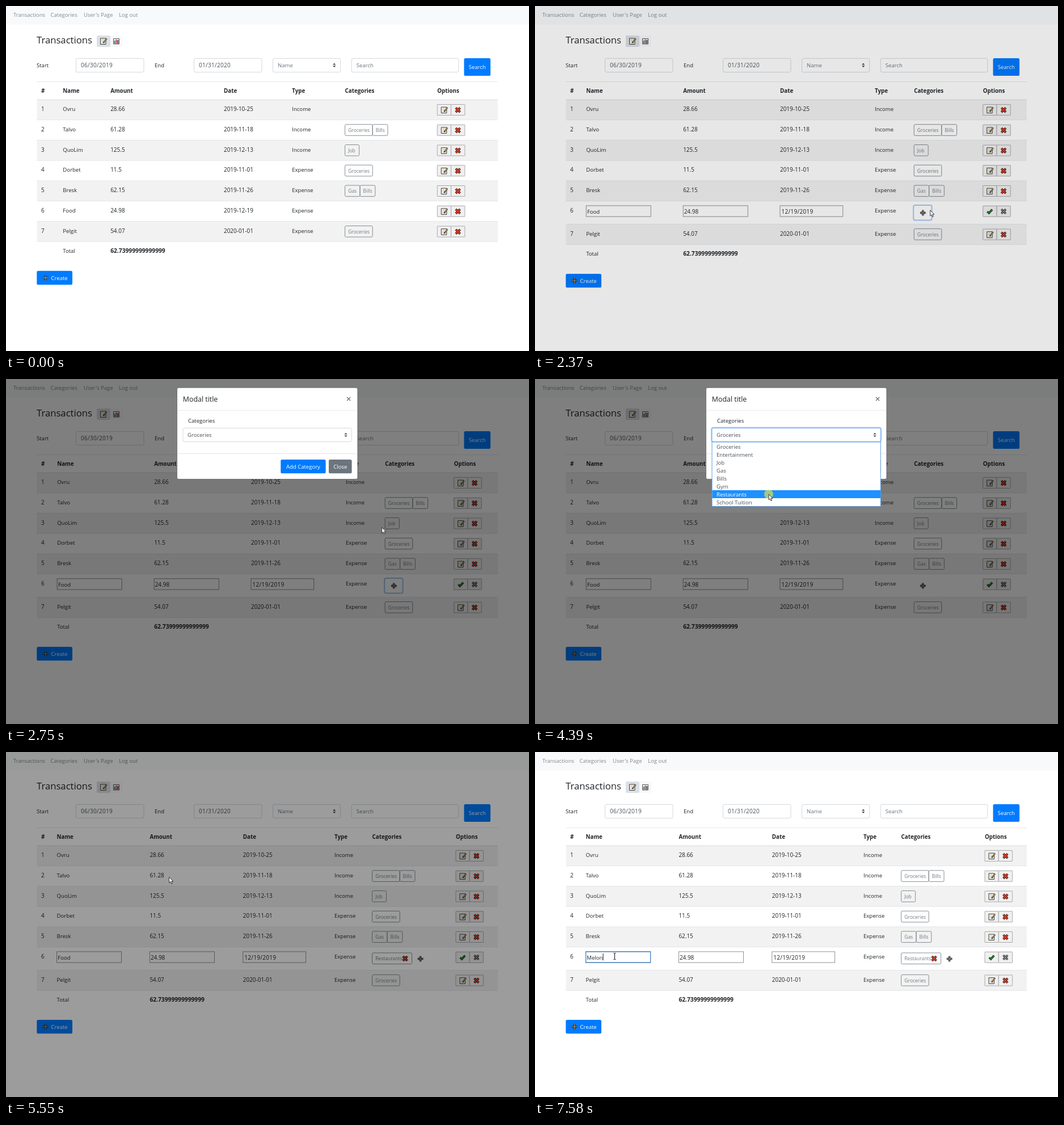
An HTML page for the animation above (8000 ms loop, 922 by 608 pixels).

```html
<!DOCTYPE html>
<html lang="en">
<head>
<meta charset="utf-8">
<title>Transactions</title>
<style>
  html, body { margin: 0; width: 100%; height: 100%; overflow: hidden; background: #fff; }
  svg { display: block; width: 922px; height: 608px; }
  text { font-family: "Open Sans", "Noto Sans", sans-serif; white-space: pre; }
</style>
</head>
<body>
<svg id="stage" viewBox="0 0 922 608" xmlns="http://www.w3.org/2000/svg"></svg>
<script>
const LOOP = 8000;
const INK = '#212529', FIELD = '#495057', MUTED = '#6c757d', LINE = '#dee2e6', BLUE = '#007bff';

// Shape helpers: each returns markup
const text = (x, y, s, o = {}) =>
  `<text x="${x}" y="${y}" font-size="${o.size || 9.55}" fill="${o.fill || INK}"` +
  ` font-weight="${o.weight || 400}" text-anchor="${o.anchor || 'start'}"` +
  ` letter-spacing="${o.gap || 0}"${o.id ? ` id="${o.id}"` : ''}>${s}</text>`;
const num = (x, y, s) => text(x, y, s, { size: 9.95 });
const bold = (x, y, s, size = 9.8) => text(x, y, s, { size, weight: 700 });
const box = (x, y, w, h, fill, stroke = 'none', r = 0, sw = 0.9, extra = '') =>
  `<rect x="${x}" y="${y}" width="${w}" height="${h}" rx="${r}" fill="${fill}" stroke="${stroke}" stroke-width="${sw}" ${extra}/>`;
const rule = (x, y, w, h = 0.8) => box(x, y, w, h, LINE);
const at = (x, y, s) => `<g transform="translate(${x} ${y})">${s}</g>`;
const group = (id, s) => `<g id="${id}">${s}</g>`;
const stroke = (d, color, w) => `<path d="${d}" fill="none" stroke="${color}" stroke-width="${w}"/>`;
const outlined = (d, color, w) => stroke(d, '#1c1c1c', w + 1.8) + stroke(d, color, w);

// Icons, centred on 0,0
const memo = '<path d="M-5-5H4.5V5.5H-5Z" fill="#f5f0e2" stroke="#3c3c3c" stroke-width="1"/>' +
  stroke('M-3-2.5H1M-3-.5H0M-3 1.5H-1M-3 3.5H3', '#aaa', 0.6) +
  stroke('M6-4.5L.2 2.8', '#2b2b2b', 2.5) + stroke('M5.6-4L1.4 1.3', '#e0b566', 1.1);
const chart = '<path d="M-5-4.5H5V5H-5Z" fill="#f4f4f4" stroke="#555" stroke-width="1"/>' +
  stroke('M-2.8 4.5V-1', '#35608e', 1.8) + stroke('M0 4.5V-3', '#c23b32', 1.8) +
  stroke('M2.8 4.5V-2', '#363048', 1.8);
const crossPath = 'M-3.8-3.8L3.8 3.8M3.8-3.8L-3.8 3.8';
const cross = outlined(crossPath, '#e23a22', 2.2);
const greyCross = outlined(crossPath, '#8d8d8d', 1.7);
const check = outlined('M-4.3.2L-1.4 3L4.3-3.2', '#18a02c', 1.7);
const plus = outlined('M-4.8 0H4.8M0-4.8V4.8', '#8b8b8b', 1.6);
const arrows = '<path d="M-2.6-.9L0-3.6L2.6-.9ZM-2.6.9L0 3.6L2.6.9Z" fill="#343a40"/>';

const field = (x, w, s, date) => box(x, 92.4, w, 24.2, '#fff', '#ced4da', 2.6) +
  text(x + 8.5, 108.2, s, { fill: date ? FIELD : MUTED, size: date ? 10 : 9.55, gap: date ? 0.3 : 0 });
const button = (x, y, w, h, fill, s) => box(x, y, w, h, fill, 'none', 2.6) +
  text(x + w / 2, y + h / 2 + 3.6, s, { fill: '#fff', anchor: 'middle' });

function header() {
  const links = [[13, 'Transactions'], [78.5, 'Categories'], [137, "User's Page"], [199, 'Log out']];
  return box(0, 0, 922, 32.6, '#f8f9fa') +
    links.map(([x, s]) => text(x, 18.8, s, { fill: '#85878a' })).join('') +
    text(54, 66, 'Transactions', { size: 16.7, weight: 500 }) +
    box(160, 52, 24, 20, '#dae0e5', 'none', 2) + at(171.5, 62, memo) +
    box(184, 52, 21, 20, '#f8f9fa', 'none', 2) + at(194.5, 62, chart) +
    text(54, 108.2, 'Start') + field(123.5, 119.5, '06/30/2019', true) +
    text(262, 108.2, 'End') + field(331.5, 119.5, '01/31/2020', true) +
    field(470.5, 119.2, 'Name') + at(578.8, 104.3, arrows) +
    field(609.3, 188.5, 'Search') + button(807.5, 92, 46.6, 31, BLUE, 'Search');
}

const rows = [
  ['Ovru', '28.66', '2019-10-25', 'Income', []],
  ['Talvo', '61.28', '2019-11-18', 'Income', ['Groceries', 'Bills']],
  ['QuoLim', '125.5', '2019-12-13', 'Income', ['Job']],
  ['Dorbet', '11.5', '2019-11-01', 'Expense', ['Groceries']],
  ['Bresk', '62.15', '2019-11-26', 'Expense', ['Gas', 'Bills']],
  ['Food', '24.98', '2019-12-19', 'Expense', []],
  ['Pelgit', '54.07', '2020-01-01', 'Expense', ['Groceries']]
];
const tagWidth = { Groceries: 48.6, Bills: 26.8, Job: 25, Gas: 26.4, Restaurants: 70 };

function tags(x, y, list) {
  return list.map(s => {
    const w = tagWidth[s];
    const out = box(x, y, w, 19.6, 'none', '#7b8288', 2) +
      text(x + 5.6, y + 13.4, s, { size: 8.5, fill: '#747c83' });
    x += w;
    return out;
  }).join('');
}

function options(x, y, first, second) {
  return [first, second].map((icon, i) =>
    box(x + i * 24.3, y - 9.5, 24.3, 19, '#f0f0f0', '#a2a2a2', 0.5) +
    at(x + 12 + i * 24.4, y + 0.2, icon)).join('');
}

const input = (x, w) => box(x, 351.9, w, 19.2, '#fff', '#858585');

function editRow(cols, tagged) {
  const [name, amount, date, type, cat, opt] = cols;
  return input(name, 114) + input(amount, 114) + input(date, 110.8) +
    (tagged ? '' : text(name + 1.7, 365.6, 'Food')) +
    num(amount + 1.5, 365.6, '24.98') +
    text(date + 2.4, 365.6, '12/19/2019', { size: 10, gap: 0.3 }) +
    text(type, 363.8, 'Expense') +
    (tagged ? tags(cat, 354, ['Restaurants']) + at(cat + 58, 364, cross) : '') +
    at(cat + (tagged ? 85 : 15.6), 364.5, plus) +
    options(opt, 361.8, check, greyCross);
}

function table(id, cols, editing, tagged) {
  const [name, amount, date, type, cat, opt] = cols;
  let s = bold(62, 153.2, '#') + rule(54.5, 133, 812.5) +
    ['Name', 'Amount', 'Date', 'Type', 'Categories', 'Options']
      .map((h, i) => bold(cols[i], 153.2, h)).join('');
  let y = 165;
  rows.forEach((r, i) => {
    const edit = editing && i === 5, h = edit ? 40.8 : 35.75;
    if (i % 2 === 0) s += box(54.5, y, 812.5, h, '#f2f2f2');
    s += rule(54.5, y - 0.4, 812.5, i ? 0.8 : 1.3) + num(62, y + 20, i + 1);
    s += edit ? editRow(cols, tagged) :
      text(name, y + 20, r[0]) + num(amount, y + 20, r[1]) +
      num(date, y + 20, r[2]) + text(type, y + 20, r[3]) +
      tags(cat, y + 8, r[4]) + options(opt, y + 18, memo, cross);
    y += h;
  });
  s += rule(54.5, y - 0.4, 812.5) + text(name, y + 19.6, 'Total') +
    bold(amount, y + 19.6, '62.73999999999999', 10.25) +
    box(54.3, y + 51.6, 62.7, 24.4, BLUE, 'none', 2.6) +
    at(69.6, y + 63.9, plus) + text(79.6, y + 67.4, 'Create', { fill: '#fff' });
  return group(id, s);
}

const choices = ['Groceries', 'Entertainment', 'Job', 'Gas', 'Bills', 'Gym', 'Restaurants', 'School Tuition'];

function modal() {
  const list = box(312, 111, 297.3, 113.4, '#fff', '#4b93dc', 0, 0.9) +
    box(312.4, 112, 296.6, 14, '#1e90ff', 'none', 0, 0, 'id="mark"') +
    choices.map((c, i) => text(320, 122.6 + i * 14, c, { id: 'choice' + i })).join('');
  return group('modal',
    box(301.5, 15.3, 318.4, 161.2, '#fff', '#55585b', 3, 0.7) +
    text(311.8, 40, 'Modal title', { size: 12.4, weight: 500 }) +
    stroke('M601 32L607.2 38.2M607.2 32L601 38.2', '#7b7b7b', 1.5) +
    rule(301.8, 54.8, 317.8) + rule(301.8, 131, 317.8) +
    text(321, 77.3, 'Categories') +
    box(311, 85.5, 299.3, 26, 'none', '#a9cdf8', 3.5, 2, 'id="selectRing"') +
    box(312, 86.5, 297.3, 24, '#fff', '#ced4da', 2.6, 0.9, 'id="select"') +
    text(320, 102.4, 'Groceries', { fill: FIELD, id: 'value' }) + at(599, 98.5, arrows) +
    button(484.3, 142, 79.3, 24.3, BLUE, 'Add Category') +
    button(569, 142, 40.6, 24.3, MUTED, 'Close') +
    group('list', list));
}

document.getElementById('stage').innerHTML =
  box(0, 0, 922, 608, '#fff') + header() +
  table('plain', [100.3, 184.2, 384, 504.3, 597.6, 760.3]) +
  table('edit', [90.2, 261.2, 432, 599, 668.2, 789.7], true) +
  table('tagged', [89.6, 253.4, 417.8, 579, 645.6, 793], true, true) +
  box(760.3, 352.3, 24.3, 19, 'rgba(0,0,0,.05)', '#555', 0.5, 1, 'id="pressed"') +
  box(667.2, 350.9, 32.4, 26.6, 'none', '#a3c7f2', 3, 2, 'id="plusRing"') +
  box(89.6, 351.9, 114, 19.2, 'none', '#3f83c9', 0, 1.3, 'id="nameRing"') +
  box(91.3, 354.5, 23, 13.5, '#3297fd', 'none', 0, 0, 'id="selection"') +
  text(91.3, 365.6, 'Food', { id: 'name' }) +
  box(0, 355, 0.9, 12.4, '#000', 'none', 0, 0, 'id="caret"') +
  box(0, 0, 922, 608, '#000', 'none', 0, 0, 'id="dim"') + modal() +
  group('pointer', '<circle id="click" r="8" fill="#f2ec3c" fill-opacity=".62"/>' +
    '<path id="arrow" d="M0 0V10L2.3 8L3.9 11.7L5.6 11L4 7.4H7.1Z" fill="#fff" stroke="#222" stroke-width=".9"/>' +
    group('beam', stroke('M-2-5.5H-.5L0-5L.5-5.5H2M0-5V5M-2 5.5H-.5L0 5L.5 5.5H2', '#111', 1)));

const el = {};
document.querySelectorAll('[id]').forEach(n => el[n.id] = n);
const show = (id, on) => el[id].setAttribute('display', on ? 'inline' : 'none');
const set = (id, attrs) => { for (const k in attrs) el[id].setAttribute(k, attrs[k]); };
const within = (t, a, b) => t >= a && t < b;
const ramp = (t, a, b) => Math.min(1, Math.max(0, (t - a) / (b - a)));

// Pointer stops: time, x, y
const path = [
  [70, 853, 553], [380, 790, 410], [550, 752, 346], [670, 771, 357], [1440, 771, 357],
  [1590, 763, 356], [1760, 761, 356], [2180, 688, 362], [2320, 688, 362], [2460, 712, 356],
  [2620, 712, 356], [2750, 663, 262], [3080, 530, 130], [3380, 430, 98], [3560, 430, 98],
  [3930, 412, 203], [4710, 412, 203], [5130, 516, 155], [5340, 516, 155], [5550, 288, 220],
  [5860, 165, 344], [6020, 138, 360], [6480, 138, 360], [6570, 140.5, 360]
];
const clicks = [[810, 1130], [2230, 2330], [3470, 3560], [4390, 4540], [5270, 5370], [6180, 6330]];
const typed = [[7110, 1], [7260, 2], [7345, 3], [7430, 4], [7580, 5]];

function pointerAt(t) {
  const i = path.findIndex(p => p[0] > t);
  if (i === 0) return path[0].slice(1);
  if (i < 0) return path[path.length - 1].slice(1);
  const a = path[i - 1], b = path[i], k = ramp(t, a[0], b[0]);
  return [a[1] + (b[1] - a[1]) * k, a[2] + (b[2] - a[2]) * k];
}

function drawModal(t, y) {
  const enter = ramp(t, 2500, 2740), leave = ramp(t, 5400, 5550);
  show('modal', t >= 2500 && t < 5550);
  const slide = -32 * ((1 - enter) ** 2 + leave ** 2);
  set('modal', { transform: `translate(0 ${slide})`, opacity: ramp(t, 2500, 2620) * (1 - leave) });
  const focus = within(t, 3470, 5270);
  show('selectRing', focus);
  set('select', { stroke: focus ? '#66a9ef' : '#ced4da' });
  el.value.textContent = t < 4540 ? 'Groceries' : 'Restaurants';
  show('list', within(t, 3560, 4540));
  const hover = Math.min(7, Math.max(0, Math.floor((y - 112) / 14)));
  set('mark', { y: 112 + hover * 14 });
  choices.forEach((c, i) => set('choice' + i, { fill: i === hover ? '#fff' : FIELD }));
}

function drawName(t) {
  const count = typed.filter(k => k[0] <= t).length;
  const selected = within(t, 6250, 7110);
  el.name.textContent = count ? 'Melon'.slice(0, typed[count - 1][1]) : 'Food';
  show('name', t >= 5380);
  set('name', { fill: selected ? '#fff' : INK });
  const w = el.name.getComputedTextLength();
  set('selection', { width: w });
  set('caret', { x: 91.6 + w });
  show('selection', selected);
  show('caret', count > 0);
  show('nameRing', t >= 6180);
}

function draw(t) {
  const [x, y] = pointerAt(t);
  show('plain', t < 1130);
  show('edit', within(t, 1130, 5380));
  show('tagged', t >= 5380);
  show('pressed', within(t, 810, 1130));
  show('plusRing', within(t, 2270, 3470));
  set('dim', { opacity: 0.5 * (ramp(t, 2343, 2493) - ramp(t, 5517, 5667)) });
  drawModal(t, y);
  drawName(t);
  const inField = t > 5600 && x < 203 && y > 352;
  show('pointer', t >= 70);
  set('pointer', { transform: `translate(${x} ${y})` });
  show('arrow', !inField);
  show('beam', inField);
  show('click', clicks.some(c => within(t, c[0], c[1])));
}

const start = performance.now();
function tick() {
  draw((performance.now() - start) % LOOP);
  requestAnimationFrame(tick);
}
tick();
</script>
</body>
</html>
```
